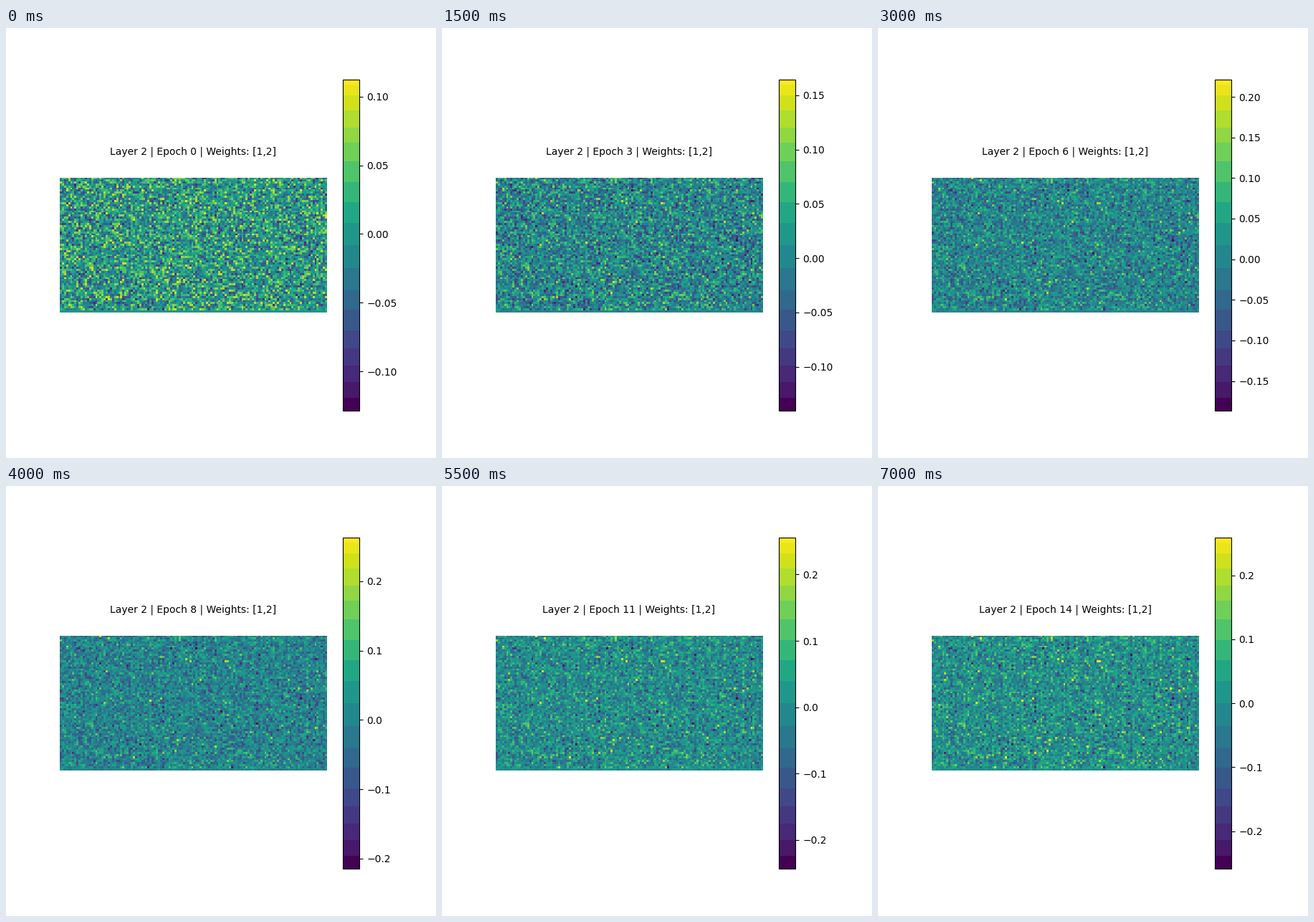
These frames come from a looping animation (600x600 px, 7.5 s). A matplotlib script:

```python
import numpy as np
import matplotlib.pyplot as plt
from matplotlib.animation import FuncAnimation
from matplotlib.colors import ListedColormap

EPOCHS = 15
ROWS, COLS = 64, 128

# Smallest and largest weight after each epoch
LOW = [-.1287, -.1261, -.1252, -.1406, -.1460, -.1551, -.1866, -.1953,
       -.2145, -.2170, -.2079, -.2433, -.2463, -.2564, -.2586]
HIGH = [.1125, .1306, .1460, .1645, .1870, .2096, .2212, .2344,
        .2630, .2635, .2462, .2556, .2628, .2650, .2590]

# Band limits of the stepped colour scale, in pixels along the colour bar
BAR_TOP, BAR_BOTTOM = 72, 534
BANDS = [534, 516, 494, 471, 447, 422, 394, 367, 335, 303, 273, 243,
         214, 186, 160, 138, 116, 94, 79, 72]


def stepped_viridis(n=256):
    edges = (BAR_BOTTOM - np.array(BANDS)) / (BAR_BOTTOM - BAR_TOP)
    mids = (edges[:-1] + edges[1:]) / 2
    mids[0], mids[-1] = 0, 1
    band = np.digitize((np.arange(n) + 0.5) / n, edges[1:-1])
    return ListedColormap(plt.get_cmap("viridis")(mids)[band])


def truncated_normal(rng, shape, std, cut=2.0):
    x = rng.standard_normal(shape)
    while (bad := np.abs(x) > cut).any():
        x[bad] = rng.standard_normal(bad.sum())
    return x * std


rng = np.random.default_rng(12)
start = truncated_normal(rng, (ROWS, COLS), 0.05)
column_gain = rng.uniform(0.5, 1.4, COLS)
column_shift = rng.normal(0, 0.012, COLS)
drift = rng.laplace(0, 0.034, (ROWS, COLS)) * column_gain + column_shift
bias = rng.normal(0, 0.02, COLS)


def weights(epoch):
    grow = ((epoch + 1) / EPOCHS) ** 0.75
    w = np.vstack([start + drift * grow, bias * grow])
    return np.clip(w, LOW[epoch], HIGH[epoch])


fig, ax = plt.subplots(figsize=(6, 6), dpi=100)
image = ax.imshow(weights(0), cmap=stepped_viridis(), interpolation="nearest",
                  vmin=LOW[0], vmax=HIGH[0])
ax.axis("off")
fig.colorbar(image, ax=ax)
title = fig.text(261 / 600, 1 - 177 / 600, "", ha="center", fontsize=10)


def update(epoch):
    image.set_data(weights(epoch))
    image.set_clim(LOW[epoch], HIGH[epoch])
    title.set_text(f"Layer 2 | Epoch {epoch} | Weights: [1,2]")
    return image, title


anim = FuncAnimation(fig, update, frames=EPOCHS, interval=500, repeat=True,
                     repeat_delay=0, blit=False)
plt.show()
```
